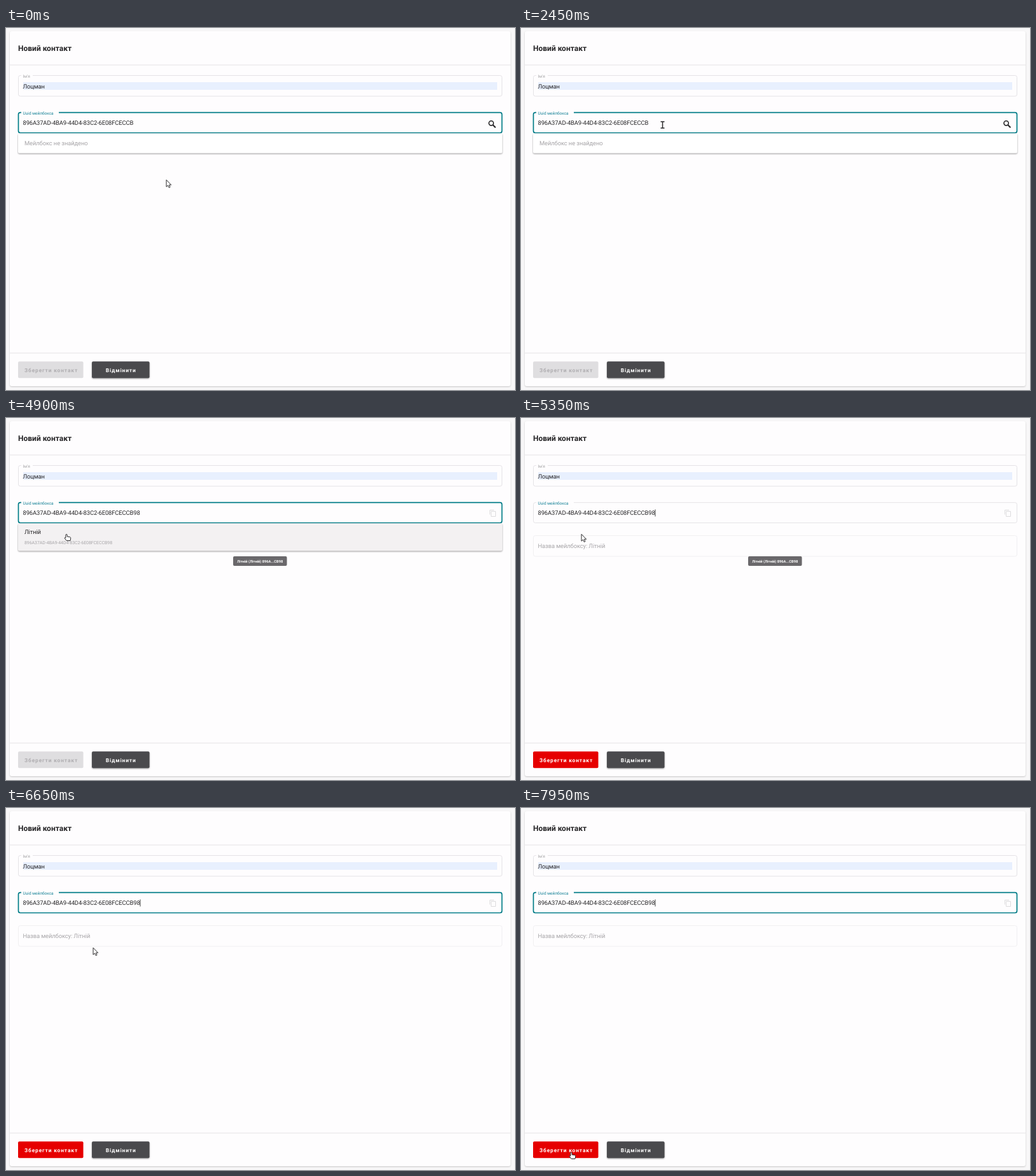
Animation, 800 px wide and 568 px high, one loop 8 s. Source, as an HTML page:

```html
<!DOCTYPE html>
<html lang="uk">
<head>
<meta charset="utf-8">
<title>Новий контакт</title>
<style>
  html, body { margin: 0; width: 100%; height: 100%; overflow: hidden; background: #f8f7f8; }
  svg { display: block; width: 800px; height: 568px; }
  text { font: 9.4px Roboto, "Open Sans", sans-serif; letter-spacing: -.1px; fill: #262527; text-rendering: geometricPrecision; white-space: pre; }
  .title { font-size: 12px; font-weight: 700; letter-spacing: 0; }
  .label { font-size: 6.5px; letter-spacing: 0; fill: #a3a2a4; }
  .small { font-size: 6.9px; letter-spacing: 0; }
  .muted { fill: #a7a5a8; }
  .button { font-size: 8.4px; font-weight: 700; letter-spacing: .88px; fill: #fff; }
  .tip { font-size: 5.7px; font-weight: 700; letter-spacing: 0; fill: #fff; }
  .line { fill: none; stroke: #e5e3e6; }
  .page { fill: #fefdfe; }
  .raised { filter: drop-shadow(0 1px 1.3px #0006); }
  .cursor path { stroke: #2a292b; fill: #fff; stroke-linejoin: round; }
</style>
</head>
<body>
<svg viewBox="0 0 800 568">
  <rect class="page" x="6" y="5" width="787" height="557" rx="3" style="filter:drop-shadow(0 1px 1px #0003)"/>
  <path class="line" d="M6 58H793M6 510H793"/>
  <text class="title" x="19" y="36.3">Новий контакт</text>

  <rect class="line" x="19.5" y="74.5" width="760" height="32.5" rx="3"/>
  <path class="page" d="M24 73h18v3H24z"/>
  <text class="label" x="26.5" y="78">Ім'я</text>
  <path fill="#e8f0fe" d="M27 85H772v12H27z"/>
  <text x="26.5" y="94.5">Лоцман</text>

  <rect id="field" fill="none" x="19.5" y="132.7" width="760" height="31.8" rx="3"/>
  <path class="page" d="M24 130h59v5H24z"/>
  <text class="label" x="26.5" y="136" style="fill:#168297">Uuid мейлбокса</text>
  <text id="uuid" x="26.5" y="152.2"></text>
  <path id="caret" d="M0 143.5v11" stroke="#333" stroke-width=".9"/>
  <g id="search" fill="none" stroke="#252426" stroke-width="1.6">
    <circle cx="762.6" cy="149.3" r="3.6"/><path d="M765.2 152l4.2 4.2" stroke-width="2"/>
  </g>
  <path id="copy" fill="none" stroke="#dddcde" d="M760.5 151.5V144.500H767M762.500 146.500h7v8h-7z"/>

  <g id="empty">
    <rect class="raised" x="19" y="165.500" width="761" height="31" rx="2" fill="#fff"/>
    <text class="muted" x="29" y="184">Мейлбокс не знайдено</text>
  </g>
  <g id="option">
    <rect id="row" class="raised" x="19" y="165.500" width="761" height="43" rx="2"/>
    <text x="29" y="182">Літній</text>
    <text class="small muted" x="29" y="197.600">896A37AD-4BA9-44D4-83C2-6E08FCECCB98</text>
  </g>
  <g id="chosen">
    <rect class="line" x="19.5" y="184.500" width="760" height="32.500" rx="3" style="stroke:#f1f0f2"/>
    <text class="muted" x="26.5" y="204.200">Назва мейлбоксу: Літній</text>
  </g>
  <g id="tooltip">
    <rect x="357" y="217" width="84.500" height="15" rx="2" fill="#6a686b"/>
    <text class="tip" x="399.2" y="226.700" text-anchor="middle">Літній (Літній) 896A...CB98</text>
  </g>

  <rect id="save" x="19" y="523.300" width="102.500" height="26" rx="2"/>
  <text id="saveText" class="button" x="29" y="539.500">Зберегти контакт</text>
  <rect class="raised" x="135" y="523.300" width="90.500" height="26" rx="2" fill="#4a4a4d"/>
  <text class="button" x="156.800" y="539.500">Відмінити</text>

  <g class="cursor">
    <path id="arrow" d="M0 .3V11.200L2.500 8.900 4.200 12.500 6 11.700 4.400 8.200H7.600Z"/>
    <path id="beam" style="fill:none;stroke-width:1.500" d="M-3-5H3M-3 5H3M0-5V5"/>
    <path id="hand" d="M0 .4C.8.4 1.100.9 1.100 1.600V4l4.100.7c1.100.2 1.600.8 1.500 1.800L6 10.500H.2L-2.700 6.900c-.6-.9.4-1.700 1.100-1.100L-1.100 6.200V1.600C-1.100.9-.8.4 0 .4Z"/>
  </g>
</svg>
<script>
const LOOP = 8000;
const TYPED_9 = 2850, TYPED_8 = 3050, FOUND = 3650, PICKED = 5300, REFOCUSED = 5400;
const caretOn = [[600, 1200], [1800, 2400], [2850, 3750], [4350, 4900], [5300, 5900], [6500, 7100], [7700, 8000]];
// time, x, y
const track = [
  [50, 252, 238], [1350, 222.5, 152], [4100, 222.5, 152], [4700, 95, 182],
  [6150, 95, 182], [6650, 137, 219], [7800, 80, 529], [7950, 79, 540]
];

const el = id => document.getElementById(id);
const set = (id, name, value) => el(id).setAttribute(name, value);
const alpha = (id, value) => set(id, 'opacity', +value);
const ramp = (t, from, to) => Math.min(1, Math.max(0, (t - from) / (to - from)));

function pointer(t) {
  let [, x, y] = track[0];
  for (let i = 1; i < track.length; i++) {
    const u = ramp(t, track[i - 1][0], track[i][0]);
    const eased = u * u * (3 - 2 * u);
    x += (track[i][1] - track[i - 1][1]) * eased;
    y += (track[i][2] - track[i - 1][2]) * eased;
  }
  return [x, y];
}

function draw(t) {
  const picked = t >= PICKED, listed = t >= FOUND && !picked;
  const focused = !picked || t >= REFOCUSED;

  el('uuid').textContent = '896A37AD-4BA9-44D4-83C2-6E08FCECCB' + (t >= TYPED_9 ? '9' : '') + (t >= TYPED_8 ? '8' : '');
  set('caret', 'transform', `translate(${26.8 + el('uuid').getComputedTextLength()})`);
  alpha('caret', caretOn.some(([from, to]) => t >= from && t < to));
  set('field', 'stroke', focused ? '#007c87' : '#e5e3e6');
  set('field', 'stroke-width', focused ? 1.7 : 1);

  const swap = ramp(t, 3050, 3250);
  alpha('search', 1 - swap);
  alpha('copy', swap);

  const [x, y] = pointer(t);
  const overRow = listed && y > 165;
  alpha('empty', t < FOUND);
  alpha('option', listed);
  alpha('chosen', picked);
  alpha('tooltip', ramp(t, 4700, 4850) - ramp(t, 5400, 5550));
  set('row', 'fill', overRow ? '#f3f1f2' : '#fff');
  set('save', 'fill', picked ? '#e60000' : '#dfdee0');
  el('saveText').style.fill = picked ? '#fff' : '#b0aeb1';

  const shape = overRow || y > 523 ? 'hand' : y > 132 && y < 165 ? 'beam' : 'arrow';
  for (const id of ['arrow', 'beam', 'hand']) {
    alpha(id, id === shape);
    set(id, 'transform', `translate(${x} ${y})`);
  }
}

const start = performance.now();
function tick() {
  draw((performance.now() - start) % LOOP);
  requestAnimationFrame(tick);
}
tick();
</script>
</body>
</html>
```
